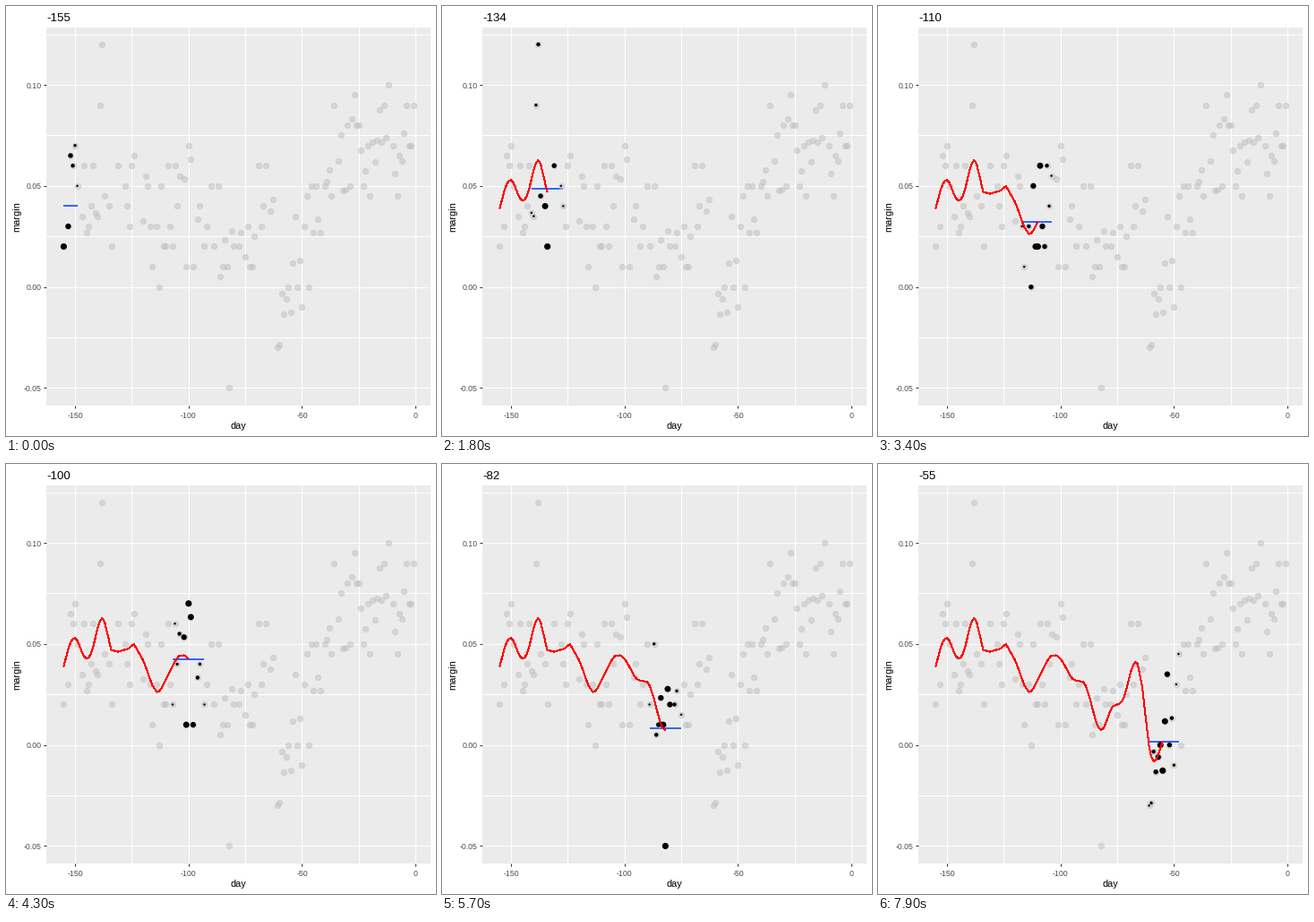
A matplotlib script for the animation above (8000 ms loop, 480 px wide and 480 px high).

```python
import matplotlib.pyplot as plt
import numpy as np
from matplotlib.animation import FuncAnimation

plt.rcParams["font.family"] = "Liberation Sans"
plt.rcParams["axes.unicode_minus"] = False

STAGE = 480
DPI = 72  # one point equals one pixel
FRAMES = 80
LEFT, RIGHT, TOP, BOTTOM = 44.9, 474.1, 23.7, 445.6

# Days without a value
GAPS = [-154, -148, -136, -133, -132, -130, -129, -123, -122, -121, -115, -103,
        -97, -94, -91, -88, -79, -76, -70, -65, -62, -41, -35, -11]
days = np.array([d for d in range(-155, 0) if d not in GAPS])
margin = np.array([
    2, 3, 6.5, 6, 7, 5, 3.5, 6, 2.67, 3, 4, 6, 3.67, 3.5, 9, 12, 4.5, 4, 2, 6,
    5, 4, 3, 6, 6.5, 3.25, 5.5, 5, 3, 1, 3, 0, 5, 2, 2, 6, 3, 2, 6, 4,
    5.5, 5.33, 1, 7, 6.33, 1, 3.33, 4, 2, 3, 5, 2, 5, 0.5, 1, 2.33, 1, -5, 2.77, 2,
    2, 2.67, 1.5, 3, 1, 1, 2.5, 6, 3, 4, 6, 3.75, 4.33, -3, -2.87, -0.33, -1.33, -0.6, 0, -1.27,
    1.17, 3.5, 0, 1.33, -1, 3, 4.5, 0, 5, 2.67, 5, 3.33, 2.67, 5, 5.2, 5.8, 4.5, 9, 6.25, 7.5,
    4.75, 4.8, 8, 5, 8.33, 9.5, 8, 8, 6.75, 5, 5.75, 7, 4.5, 7.15, 6.17, 7.25, 8.75, 7.15, 9, 7.4,
    10, 7, 5.63, 4.5, 6.5, 6.25, 7.6, 9, 7, 7, 9,
]) / 100

SPAN = 7
LOCAL_SD = 0.4 * SPAN
CURVE_SD = 0.3706506 * SPAN


def bell(dist, sd):
    return np.exp(-0.5 * (dist / sd) ** 2)


def smooth(day):
    dist = np.abs(days - day)
    w = bell(dist, CURVE_SD) * (dist <= 4 * CURVE_SD)
    return np.sum(w * margin) / np.sum(w)


def radius(size):
    return 0.375 * (2.845 * size + 0.945)


curve = np.array([smooth(d) for d in days])

fig = plt.figure(figsize=(STAGE / DPI, STAGE / DPI), dpi=DPI, facecolor="white")
ax = fig.add_axes([LEFT / STAGE, 1 - BOTTOM / STAGE,
                   (RIGHT - LEFT) / STAGE, (BOTTOM - TOP) / STAGE],
                  facecolor="#EBEBEB")
ax.set_xlim(-155 - 7.7, -1 + 7.7)
ax.set_ylim(-0.05 - 0.0085, 0.12 + 0.0085)
for spine in ax.spines.values():
    spine.set_visible(False)

ax.set_xticks([-150, -100, -50, 0])
ax.set_yticks([-0.05, 0, 0.05, 0.1])
ax.set_xticks([-125, -75, -25], minor=True)
ax.set_yticks([-0.025, 0.025, 0.075, 0.125], minor=True)
ax.xaxis.set_major_formatter("{x:.0f}")
ax.yaxis.set_major_formatter("{x:.2f}")
ax.set_axisbelow(True)
ax.grid(which="both", color="white", linewidth=1)
ax.tick_params(which="minor", length=0)
ax.tick_params(which="major", length=2.75, width=1, color="#333333",
               labelcolor="#4D4D4D", labelsize=8.8)
ax.tick_params(axis="x", pad=4.3)
ax.tick_params(axis="y", pad=2.2)


def label(x, y, text, size, **kw):
    return fig.text(x / STAGE, 1 - y / STAGE, text, fontsize=size, color="black",
                    va="baseline", rotation_mode="anchor", **kw)


label((LEFT + RIGHT) / 2, 472.5, "day", 11, ha="center")
label(15.3, (TOP + BOTTOM) / 2, "margin", 11, ha="center", rotation=90)
title = label(44.9, 16.8, "", 13.2, ha="left")

grey = (190 / 255, 190 / 255, 190 / 255, 0.5)
ax.scatter(days, margin, s=(2 * radius(3) - 0.6) ** 2, facecolor=[grey],
           edgecolor=[grey], linewidth=0.75, zorder=3)
level, = ax.plot([], [], color="#3366FF", linewidth=2, zorder=2.5,
                 solid_capstyle="butt")
near = ax.scatter([], [], color="black", linewidth=0, zorder=4)
trace, = ax.plot([], [], color="red", linewidth=1, zorder=5, antialiased=False,
                 solid_capstyle="butt")


def update(i):
    center = days[i]
    inside = np.abs(days - center) <= SPAN
    x, y = days[inside], margin[inside]
    w = bell(x - center, LOCAL_SD)
    low = bell(SPAN, LOCAL_SD)
    size = 3 * np.sqrt(np.clip((w - low) / (1 - low), 0, 1))

    near.set_offsets(np.column_stack([x, y]))
    near.set_sizes((2 * np.maximum(radius(size), 1.2)) ** 2)
    mean = np.sum(w * y) / np.sum(w)
    level.set_data([x[0], x[-1]], [mean, mean])
    trace.set_data(days[:i + 1], curve[:i + 1])
    title.set_text(str(center))
    return level, near, trace, title


anim = FuncAnimation(fig, update, frames=FRAMES, interval=100, repeat=True,
                     repeat_delay=0, blit=False)
plt.show()
```
